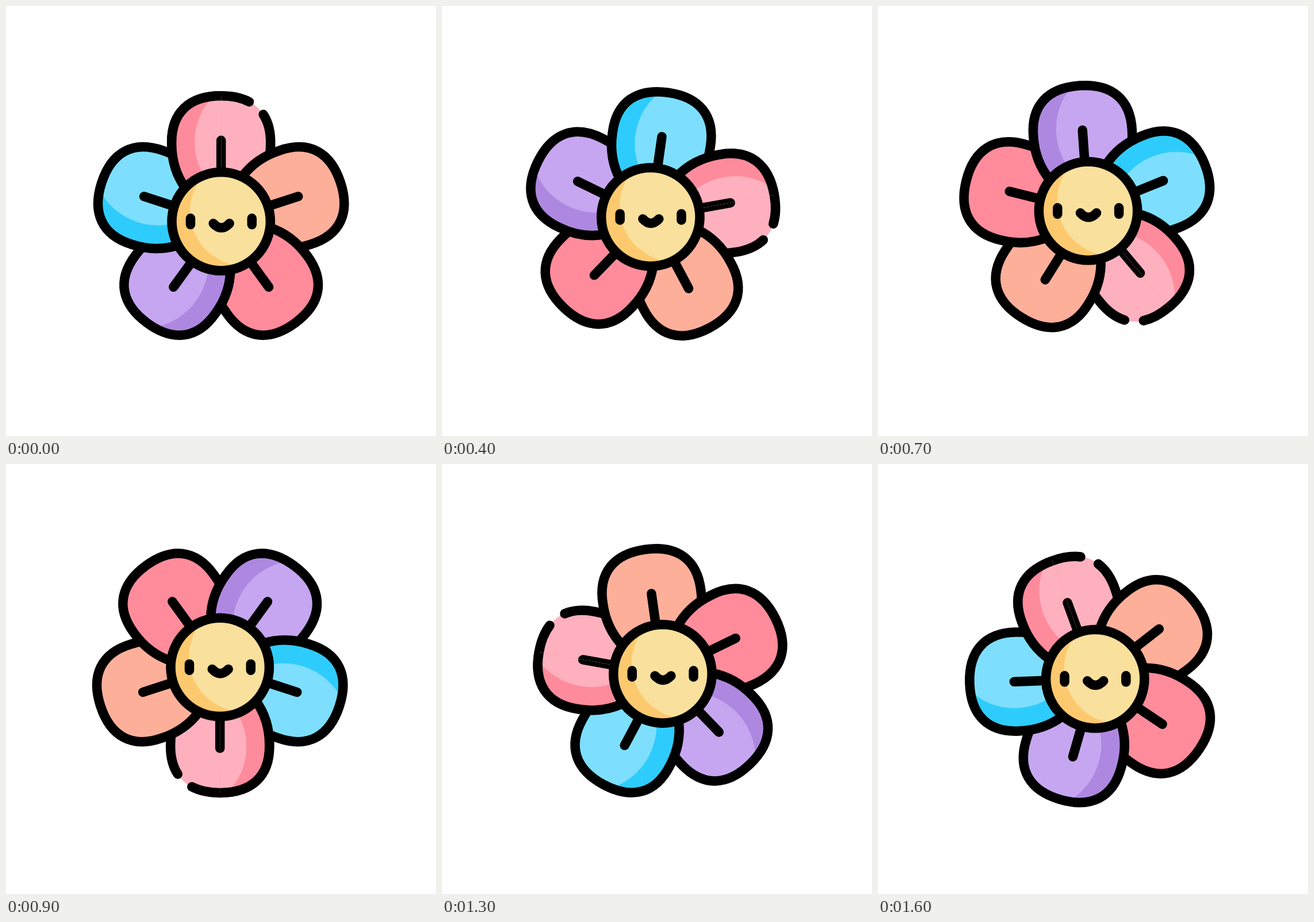
Recreate the animation shown at these times as an HTML page with a canvas. Size 748x748 px, loop 1.7 s.

```html
<!DOCTYPE html>
<html lang="en">
<head>
<meta charset="utf-8">
<title>Spinning flower</title>
<style>
  html, body { margin: 0; width: 100%; height: 100%; overflow: hidden; background: #fff; }
  canvas { display: block; width: 748px; height: 748px; }
</style>
</head>
<body>
<canvas id="stage" width="748" height="748"></canvas>
<script>
const ctx = document.getElementById('stage').getContext('2d');

const LOOP_MS = 1700;
const STEP_MS = 100;
const STEP_ANGLE = 20;
const SKIP_AT = 13; // the turn jumps one extra step here
const PIVOT = { x: 373.2, y: 364.1 };
const OFFSET = { x: 1, y: 10.7 };
const LINE = 16.5;

// Petals are described pointing up, with the flower's centre at the origin.
const LEFT_SIDE = 'M-62 -58C-78 -80 -86 -105 -86 -135C-87 -190 -55 -218.5 0 -218.5';
const LOWER_RIGHT = 'C86 -105 78 -80 62 -58';
const outline = new Path2D(LEFT_SIDE + 'C55 -218.5 87 -190 86 -135' + LOWER_RIGHT);
const gappedOutline = new Path2D(
  LEFT_SIDE + 'C19.3 -218.5 35.7 -215 48.9 -208.1' +
  'M73.4 -186.1C82 -173 86.4 -155.9 86 -135' + LOWER_RIGHT);
const stem = new Path2D('M0 -141V-80');
const eyes = new Path2D('M-53.2 -5.5V5.5M53.6 -5.5V5.5');
const mouth = new Path2D('M-13.5 3.5Q0.5 18.5 14.5 3.5');

// Clockwise from the top; each petal overlaps the one before it.
const petals = [
  { light: '#feb0be', shade: '#fe8b9b', edge: gappedOutline },
  { light: '#feaf9a', edge: outline },
  { light: '#ff8b9b', edge: outline },
  { light: '#c6a6f0', shade: '#ae88e0', edge: outline },
  { light: '#7ddffd', shade: '#2eccfc', edge: outline }
];

const radians = degrees => degrees * Math.PI / 180;

function disc(x, y, radius) {
  const path = new Path2D();
  path.arc(x, y, radius, 0, 2 * Math.PI);
  return path;
}

const petalLight = disc(69, -138, 115);
const face = disc(0, 0, 85.7);
const faceLight = disc(42, -18, 96);

function fillShaded(shape, lightArea, light, shade) {
  ctx.save();
  ctx.fillStyle = shade || light;
  ctx.fill(shape);
  if (shade) {
    ctx.clip(shape);
    ctx.fillStyle = light;
    ctx.fill(lightArea);
  }
  ctx.restore();
}

function drawPetal(index, leftHalfOnly) {
  const { light, shade, edge } = petals[index];
  ctx.save();
  ctx.rotate(radians(72 * index));
  if (leftHalfOnly) {
    ctx.beginPath();
    ctx.rect(-150, -260, 150, 260);
    ctx.clip();
  }
  fillShaded(outline, petalLight, light, shade);
  ctx.stroke(edge);
  ctx.stroke(stem);
  ctx.restore();
}

function drawFace() {
  fillShaded(face, faceLight, '#f9e09c', '#fdc96f');
  ctx.stroke(face);
  ctx.stroke(eyes);
  ctx.stroke(mouth);
}

function draw(time) {
  const step = Math.floor((time % LOOP_MS) / STEP_MS);
  const angle = radians(STEP_ANGLE * (step < SKIP_AT ? step : step + 1));

  ctx.fillStyle = '#fff';
  ctx.fillRect(0, 0, 748, 748);
  ctx.strokeStyle = '#000';
  ctx.lineWidth = LINE;
  ctx.lineCap = 'round';
  ctx.lineJoin = 'round';

  ctx.save();
  ctx.translate(PIVOT.x, PIVOT.y);
  ctx.rotate(angle);
  ctx.translate(OFFSET.x, OFFSET.y);
  petals.forEach((petal, index) => drawPetal(index, false));
  drawPetal(0, true); // closes the ring of overlaps
  ctx.rotate(-angle); // the face stays upright
  drawFace();
  ctx.restore();
}

let start;
function tick(now) {
  if (start === undefined) start = now;
  draw(now - start);
  requestAnimationFrame(tick);
}
draw(0);
requestAnimationFrame(tick);
</script>
</body>
</html>
```
